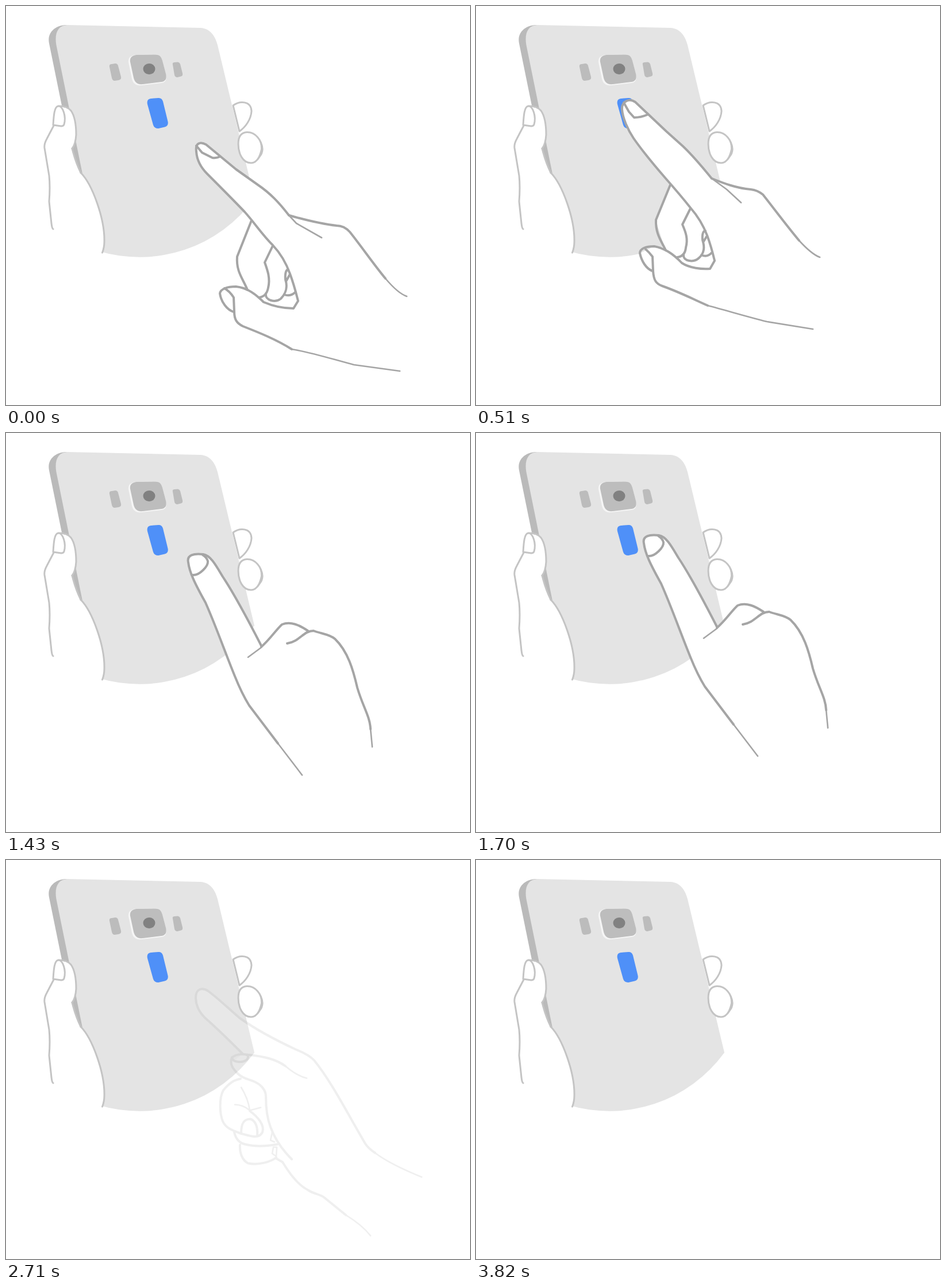
An HTML page that plays this animation: 807x694 px, repeating every 3.99 s.

```html
<!DOCTYPE html>
<html lang="en">
<head>
<meta charset="utf-8">
<title>Fingerprint enrolment</title>
<style>
html, body { margin: 0; width: 100%; height: 100%; overflow: hidden; background: #fff; }
svg { display: block; width: 807px; height: 694px; }
.hand path { fill: none; stroke: #a5a5a5; stroke-width: 4; stroke-linecap: round; stroke-linejoin: round; }
.hand .skin { fill: #fff; stroke: none; }
.hand .thin { stroke-width: 2.6; }
.holder path { fill: #fff; stroke: #c4c4c4; stroke-width: 3; stroke-linecap: round; stroke-linejoin: round; }
.holder .bare { stroke: none; }
.holder .open { fill: none; }
.holder .shade { fill: #c4c4c4; stroke: none; }
</style>
</head>
<body>
<svg viewBox="0 0 807 694">
  <g id="phone">
    <path fill="#bababa" d="M106 33C86 33 71 46 75 65L98 178L126 294L140 300L120 100Z"/>
    <path fill="#e4e4e4" d="M106 33L338 38C355 39 364 52 368 68L432 335A247 247 0 0 1 160 426L133 292L87.500 68C84 48 90 34 106 33Z"/>
    <path fill="#f5f5f5" d="M213 98C212 90 217 86 226 85L258 84C267 84 270 88 272 95L278 120C280 129 277 133 270 134L236 138C226 139 221 135 219 127Z"/>
    <path fill="#bdbdbd" d="M216 97C215 90 219 86 227 85L258 84.500C267 84 270 88 272 95L278 118C280 127 277 131 270 132L238 136C229 137 224 133 222 125Z"/>
    <ellipse fill="#818181" cx="249" cy="109.500" rx="10.500" ry="9.500"/>
    <path fill="#bcbcbc" d="M180 106Q179 101 184 101L190 100Q194 100 195 104L200 123Q201 128 196 129L189 130Q185 130 184 125ZM290 102Q289 98 293 98L299 97.500Q302 98 303 101L307 117Q308 122 304 122.500L298 124Q294 124 293 120Z"/>
    <path fill="#4f90f8" d="M246 171Q244 162 252 161L265 160Q271 159.500 273 166L281.500 201Q283 209 276 210.500L265 213Q258 213 256 207Z"/>
  </g>
  <g class="holder">
    <path class="bare" d="M82 388L67 245L82 208L91 174L108 178C120 188 123 210 122 225Q121 240 115 248Q121 272 130 290C150 310 172 370 171 410Q171 420 167 429L148 423Z"/>
    <path class="open" d="M82 388Q80 387 79 378L75 340Q77 315 75 295L67 247Q66 240 71 231L83 208"/>
    <path class="open" d="M92 174C100 174 108 176 113 182C120 192 122 208 122 224Q121 240 115 248M130 290C150 310 172 370 171 410Q171 420 167.500 429"/>
    <path class="open" d="M115 248Q121 272 130 290"/>
    <path d="M82 207C83 190 84 175 91 174C99 174 105 192 101 206Q100 209 96 209Z"/>
    <path d="M395 173C406 165 426 164 427 183C426 198 416 211 406 218Z"/>
    <path d="M404 240C404 228 408 220 419 219.500C434 219 445 234 445 247C442 262 436 273 426 273C412 273 404 257 404 240Z"/>
    <path class="shade" d="M436 226Q453 243 445 259L438 269Q449 244 436 226Z"/>
  </g>
  <g class="hand" id="a"></g>
  <g class="hand" id="b"></g>
  <g class="hand" id="c"></g>
</svg>
<script>
const LOOP = 3990, TICK = 30;
const el = id => document.getElementById(id);

// Each row: class, path at rest, path when touching
const handA = [
  ['skin',
   'M372 262L348 241C337 235 329 239 331 253C332 270 340 282 350 292L415 358L427 372L402 436L420 494L398 488L372 500L396 532L400 548L497 597L685 635L697 505L598 393L575 382L492 364L438 311Z',
   'M298 188L277 167C264 159 253 168 254 180C255 195 264 215 274 230L330 300L338 311L313 374L330 426L310 418L285 430L307 461L311 478L403 521L586 562L598 437L499 328L478 319L410 300L360 244Z'],
  ['',
   'M427 373L402 436C400 462 412 474 420 494',
   'M338 311L313 372C312 396 322 408 330 425'],
  ['',
   'M464 417L450 446C455 460 460 474 456 490C454 501 448 506 440 507',
   'M373 352L359 380C365 394 369 405 365 420C364 431 358 436 350 437'],
  ['',
   'M452 500C450 512 468 517 478 509C487 500 490 488 486 476C485 465 487 458 491 459M487 479L493 468M484 502Q494 506 503 498',
   'M361 433C360 444 379 447 388 438C397 430 398 419 394 407C393 397 395 391 399 391M395 411L401 401M392 433Q402 438 410 429'],
  ['',
   'M492 364C475 342 460 326 438 311L400 284L348 241C337 235 329 239 331 253C332 270 340 282 350 292C370 312 395 337 415 358C433 378 445 397 464 416C480 433 489 452 494 466Q501 485 508 513L500 526C482 526 462 521 448 515C435 502 420 490 400 488C385 488 373 492 372 500C374 515 385 529 396 532',
   'M410 300C395 282 381 264 360 244L331 218L277 167C264 159 253 168 254 180C255 195 264 215 274 230C290 253 310 277 330 300C345 317 358 332 373 351C388 368 397 386 402 399Q409 418 415 443L407 457C392 458 372 456 358 447C344 432 328 421 310 418C295 418 285 422 285 430C288 444 296 457 307 461'],
  ['',
   'M331 243L341 255L359 264Q366 265 372 262',
   'M257 168L266 184L275 194Q287 194 298 189'],
  ['',
   'M380 491Q389 496 396 507L397 532C397 546 402 552 412 557C440 568 470 580 497 597',
   'M295 423Q301 428 307 436L308 461C309 477 313 483 324 487C355 498 380 511 403 521'],
  ['thin',
   'M497 597C530 602 570 615 605 624L685 635',
   'M403 521C437 530 470 540 506 549L586 562'],
  ['',
   'M492 364C520 372 548 379 575 382Q588 382 598 393C618 418 640 450 660 474',
   'M410 300C430 308 453 317 478 319Q489 320 499 328C518 352 541 383 562 408'],
  ['thin',
   'M660 474Q682 500 697 505M492 364L505 378L549 403',
   'M562 408Q584 432 598 437M410 300L436 319L461 342']
];

const handB = [
  ['skin', 'M292 190C290 180 302 176 318 178C330 182 340 195 352 215L419 337L455 300L500 311L548 325L586 410L612 513L491 563L397 440L373 390L322 262C302 225 296 208 292 190Z'],
  ['', 'M419 337C398 296 372 247 352 217C340 197 331 180 318 178C302 176 289 179 292 192C294 209 303 228 322 262C341 305 355 346 373 390Q385 420 398 441L448 507'],
  ['thin', 'M448 507L490 562M396 357L419 340M609 482L612 513'],
  ['', 'M300 214C311 215 327 199 326 190Q324 183 317 179'],
  ['', 'M419 339C435 325 444 310 455 300C470 294 485 301 500 311'],
  ['', 'M464 333C487 329 492 311 510 311C523 316 538 317 547 325C570 347 579 380 586 410C596 444 608 460 609 482']
];

const handC = [
  ['skin', 'M346 288L280 225C268 213 264 200 264 190C264 176 273 171 285 178L340 225C368 245 408 266 438 280Q461 289 470 299L559 444L657 502L568 604L488 538L415 476L355 478L341 445L332 425L311 405L308 365L323 340L342 331L325 303Z'],
  ['', 'M346 288C320 262 295 238 280 225C268 213 264 200 264 190C264 176 273 171 285 178C303 191 320 208 340 225C368 245 408 266 438 280Q461 289 470 299C500 336 526 388 559 444Q564 452 576 460'],
  ['thin', 'M576 460C597 476 630 491 657 502M525 568Q553 585 568 604'],
  ['', 'M342 331C330 333 322 339 312 351C304 365 306 393 311 405C316 416 325 420 342 426C360 431 374 436 380 424C384 412 373 398 358 387'],
  ['thin', 'M343 346Q355 365 358 386M332 376Q346 376 358 386L377 381'],
  ['', 'M343 425C343 408 348 401 359 401C368 404 372 415 371 428'],
  ['', 'M331 424C334 437 340 443 350 445C370 450 389 448 406 445M341 446C340 460 345 473 355 478C374 482 395 475 404 468'],
  ['thin', 'M397 424L394 438L401 441M399 450L397 461L404 466L405 450Z'],
  ['', 'M327 294C336 287 350 287 355 291C356 300 345 303 335 301Q328 300 327 294Z'],
  ['', 'M327 294C322 306 330 315 337 322C346 331 357 332 366 336C377 341 386 350 386 362C386 385 389 402 394 415C402 437 415 455 431 471'],
  ['', 'M352 289C385 292 405 298 420 309'],
  ['thin', 'M420 309Q440 326 457 330'],
  ['', 'M403 469L415 476C425 492 440 515 460 525C470 532 480 531 488 538L525 568']
];

function build(id, rows) {
  return rows.map(([cls, d]) => {
    const p = document.createElementNS('http://www.w3.org/2000/svg', 'path');
    if (cls) p.setAttribute('class', cls);
    p.setAttribute('d', d);
    el(id).append(p);
    return p;
  });
}

function mix(from, to, k) {
  const ends = to.match(/\d+/g);
  let i = 0;
  return from.replace(/\d+/g, n => (+n + (ends[i++] - n) * k).toFixed(2));
}

// Progress of n equal ticks, the first one landing at start
const ticks = (t, start, n) =>
  Math.max(0, Math.min(1, (Math.floor((t - start + 0.5) / TICK) + 1) / n));

// Sum of moves: [start, ticks, dx, dy]
const travel = (t, x, y, moves) => moves.reduce(
  (p, [start, n, dx, dy]) => {
    const k = ticks(t, start, n);
    return [p[0] + dx * k, p[1] + dy * k];
  }, [x, y]);

function place(id, alpha, [x, y]) {
  const s = el(id);
  s.setAttribute('opacity', alpha.toFixed(3));
  s.setAttribute('transform', `translate(${x.toFixed(2)} ${y.toFixed(2)})`);
}

const pathsA = build('a', handA);
build('b', handB);
build('c', handC);

function draw(t) {
  const reach = ticks(t, 30, 17) - ticks(t, 810, 7);
  pathsA.forEach((p, i) => p.setAttribute('d', mix(handA[i][1], handA[i][2], reach)));
  place('a', 1 - ticks(t, 1020, 5) ** 1.3, [0, 0]);

  place('b', ticks(t, 1310, 5) - ticks(t, 2420, 5), travel(t, 25, 33, [
    [1460, 9, -25, -33], [1730, 5, -35, -14], [1880, 18, 60, 47]
  ]));

  place('c', ticks(t, 2710, 6) - ticks(t, 3540, 7), travel(t, 66, 49.5, [
    [2890, 9, -77, -57.5], [3330, 7, 77, 57.5]
  ]));
}

const begin = performance.now();
function frame() {
  draw((performance.now() - begin) % LOOP);
  requestAnimationFrame(frame);
}
frame();
</script>
</body>
</html>
```
